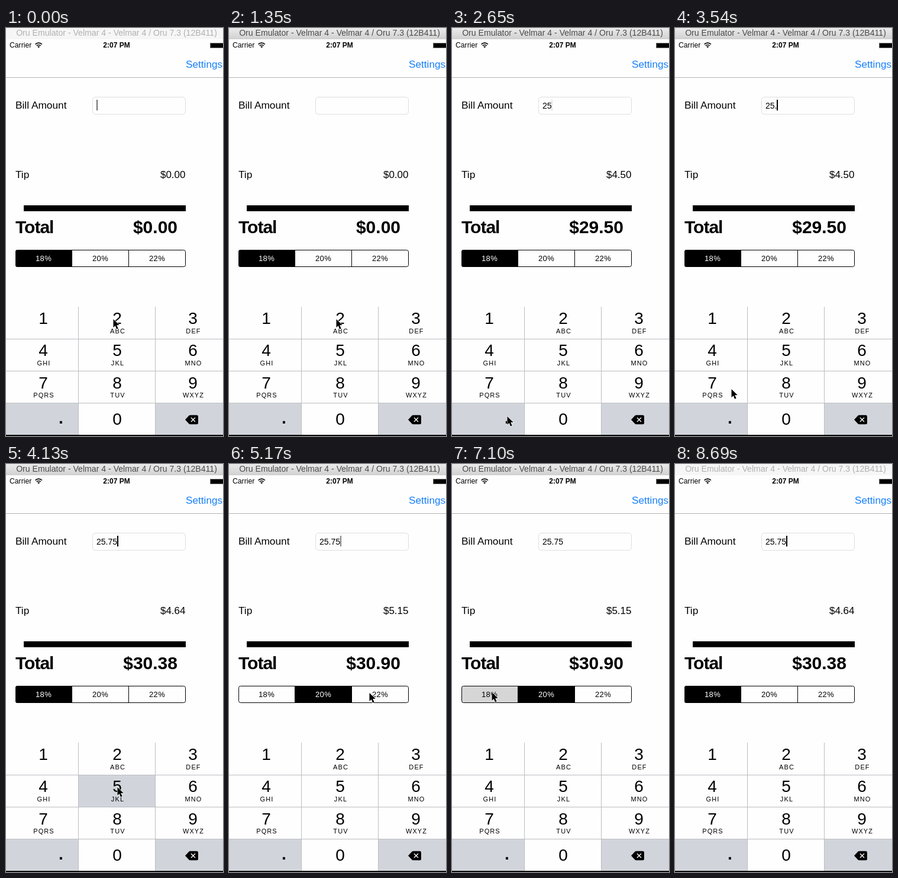
An HTML page for the animation above (8790 ms loop, 367 by 688 pixels).

```html
<!DOCTYPE html>
<html lang="en">
<head>
<meta charset="utf-8">
<title>Tip calculator</title>
<style>
  html, body { margin: 0; width: 100%; height: 100%; overflow: hidden; background: #fefefe; }
  svg { display: block; font-family: "Liberation Sans", Arial, sans-serif; white-space: pre; }
</style>
</head>
<body>
<svg id="stage" width="367" height="688" viewBox="0 0 367 688"></svg>
<script>
const LOOP = 8790, STEP = 147.5;   // the screen refreshes once per step
const PAGE = '#fefefe', GREY = '#d1d5db', LINE = '#bcbdc0';
const FOCUS = 7, LEAVE = 55;       // steps at which the window gains and loses focus

// Clicks: step, target, pointer x and y
const clicks = [
  [10, '2', 181, 491], [14, '5', 179, 541], [22, '.', 93, 655], [25, '7', 95, 609], [28, '5', 188, 545],
  [33, '20%', 152, 388], [39, '22%', 237, 386], [44, '20%', 138, 386], [49, '18%', 67, 385],
  [LEAVE, '', 110, 449]];
const keyClicks = clicks.filter(c => c[1].length === 1);
const rateClicks = [[-9, '18%'], ...clicks.filter(c => c[1].endsWith('%'))];
const rates = ['18%', '20%', '22%'];

const clamp = v => Math.max(0, Math.min(1, v));
const mix = (a, b, k) => a + (b - a) * k;
const last = (list, n) => list.findLast(item => item[0] <= n);
const rect = (x, y, w, h, fill, more = '') =>
  `<rect x="${x}" y="${y}" width="${w}" height="${h}" fill="${fill}" ${more}/>`;
const text = (str, x, y, size, more = '') =>
  `<text x="${x}" y="${y}" font-size="${size}" ${more}>${str}</text>`;
const MID = 'text-anchor="middle" ', END = 'text-anchor="end" ', BOLD = 'font-weight="bold" ';

// Ten-thousandths to dollars, ties to the even cent
function money(n) {
  const cents = n / 100;
  let r = Math.round(cents);
  if (cents % 1 === 0.5 && r % 2) r--;
  return '$' + (r / 100).toFixed(2);
}

// After each click the pointer glides to the next target in two steps
function pointer(n) {
  if (n >= LEAVE) return '';
  const next = clicks.find(c => c[0] > n);
  const from = last(clicks, n) || next;
  const k = clamp((n - from[0]) / 2);
  return `<path transform="translate(${mix(from[2], next[2], k)} ${mix(from[3], next[3], k)})"
    d="M.5 0V14l3.2-3 2.300 5.600 2.600-1.100-2.400-5.400h4.500z" stroke="#fff" stroke-width="1.2" paint-order="stroke"/>`;
}

function header(active) {
  return rect(0, 0, 367, 19, active ? 'url(#bar)' : '#f6f6f6') +
    text('Oru Emulator - Velmar 4 - Velmar 4 / Oru 7.3 (12B411)', 187, 13, 14.1,
      MID + `fill="${active ? '#4a4a4a' : '#b0b0b0'}"`) +
    text('Carrier', 6, 33, 12.2) +
    `<path d="M49.5 27.5a8 8 0 0 1 11.4 0M51.7 29.9a4.9 4.9 0 0 1 7 0" fill="none" stroke="#000" stroke-width="1.6"/>
     <path d="M55.2 33.6l-2-2.200a2.800 2.800 0 0 1 4 0z"/>` +
    text('2:07 PM', 187, 33, 12, MID + BOLD) +
    rect(345.5, 25.5, 24, 8, '#000', 'stroke="#777"') +
    text('Settings', 304, 67, 17.2, 'fill="#157efb"') +
    rect(0, 83, 367, 1, '#b2b2b2');
}

function caret(ms, width) {
  const typed = last(keyClicks, ms / STEP);
  const start = typed ? typed[0] * STEP + 987 : 470;
  const period = 1155, p = ((ms - start) % period + period) % period;
  const alpha = p < 620 ? clamp(p / 110) : clamp((770 - p) / 150);
  return rect(Math.floor(153 + width), 121, 2, 18, '#000', `opacity="${alpha}"`);
}

function amounts(n, ms) {
  const bill = keyClicks.filter(c => c[0] <= n).map(c => c[1]).join('');
  const cents = Math.round(bill * 100), tip = cents * parseInt(last(rateClicks, n)[1]);
  const width = 7.8 * bill.length - (bill.includes('.') ? 3.9 : 0);
  return text('Bill Amount', 16, 135.5, 17.3) +
    rect(146.5, 116.5, 157, 29, PAGE, 'rx="4.5" stroke="#dedede"') +
    text(bill, 153, 136, 14) + caret(ms, width) +
    text('Tip', 16, 253, 17.2) +
    text(money(tip), 303.5, 253, 17, END) +
    rect(30, 299, 274, 10, '#000') +
    text('Total', 16, 346, 30, BOLD + 'letter-spacing="-1"') +
    text(money(cents * 100 + tip), 290, 346, 30, END + BOLD);
}

function segments(n) {
  const [since, chosen] = last(rateClicks, n);
  const [, before] = last(rateClicks, since - 1) || [0, chosen];
  const fade = before === chosen ? 1 : clamp((n - since + 1) / 2);
  const held = rateClicks.find(c => c[0] === n + 1);
  const cells = rates.map((rate, i) => {
    const dark = rate === chosen ? fade : rate === before ? 1 - fade : 0;
    const x = 16 + i * 96;
    return rect(x, 374, 96, 29, held && held[1] === rate ? '#d6d6d6' : PAGE) +
      rect(x, 374, 96, 29, '#000', `opacity="${dark}"`) +
      text(rate, x + 47.6, 393, 13, MID + `letter-spacing=".4" fill="${dark > 0.4 ? '#fff' : '#000'}"`);
  });
  return `<g clip-path="url(#pill)">${cells.join('')}</g>` +
    rect(16.5, 374.5, 287, 28, 'none', 'rx="3" stroke="#000"') +
    rect(111, 374, 1, 29, '#000') + rect(207, 374, 1, 29, '#000');
}

function keypad(n) {
  const down = keyClicks.find(c => c[0] === n)?.[1];
  const letters = ['', 'ABC', 'DEF', 'GHI', 'JKL', 'MNO', 'PQRS', 'TUV', 'WXYZ'];
  const edges = [0, 122, 252, 367], centres = [63, 188, 316];
  let out = '';
  [...'123456789.0<'].forEach((key, i) => {
    const col = i % 3, row = Math.floor(i / 3), y = 470 + 54 * row;
    const special = key === '.' || key === '<';
    out += rect(edges[col], y, edges[col + 1] - edges[col], 54, special !== (key === down) ? GREY : PAGE);
    if (key === '.') out += text('.', 93, 666.5, 28, MID + BOLD);
    else if (!special) out += text(key, centres[col], y + (row < 3 ? 29 + 0.4 * row : 37), 28, MID);
    if (letters[i]) out += text(letters[i], centres[col] + 1, y + 45, 11, MID + 'letter-spacing="1.1"');
  });
  for (const y of [524, 578, 632]) out += rect(0, y, 367, 1, LINE);
  for (const x of [122, 252]) out += rect(x, 470, 1, 216, LINE);
  return out +
    `<path d="M303 660.5l6.5-7q.8-.8 2-.8h11q2.500 0 2.500 2.500v10.500q0 2.500-2.500 2.500h-11q-1.200 0-2-.8z"/>
     <path d="M313 657l7 7m0-7l-7 7" stroke="#fff" stroke-width="1.4"/>` +
    rect(0, 686, 367, 2, '#000');
}

const defs = `<defs>
  <linearGradient id="bar" x2="0" y2="1"><stop stop-color="#ebebeb"/><stop offset="1" stop-color="#d0d0d0"/></linearGradient>
  <clipPath id="pill">${rect(16, 374, 288, 29, '#000', 'rx="3.5"')}</clipPath></defs>`;

const stage = document.getElementById('stage');
const origin = performance.now();
function draw() {
  const ms = (performance.now() - origin) % LOOP, n = Math.floor(ms / STEP);
  stage.innerHTML = defs + header(n >= FOCUS && n < LEAVE) + amounts(n, ms) +
    segments(n) + keypad(n) + pointer(n);
  requestAnimationFrame(draw);
}
draw();
</script>
</body>
</html>
```
